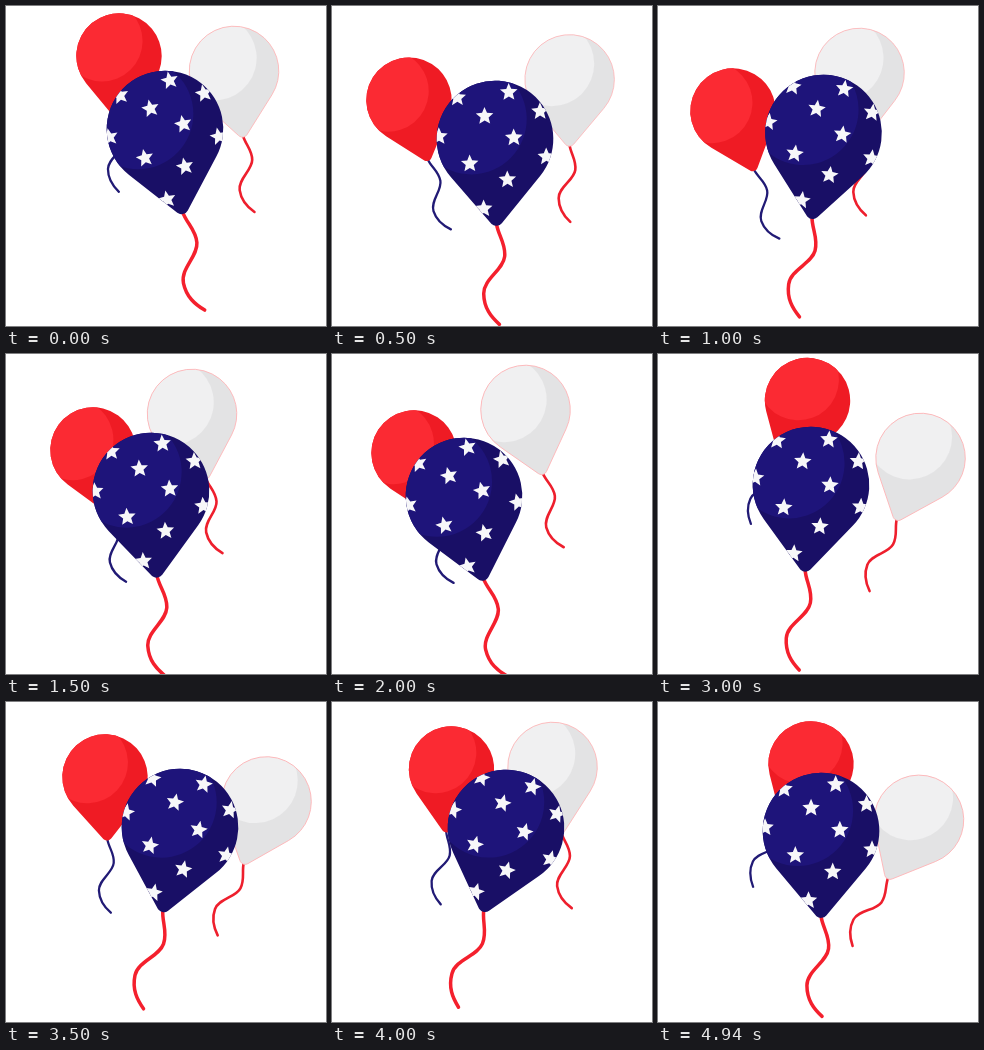
An HTML page with a canvas that plays this animation: 320 px wide and 320 px high, repeating every 5 s.

```html
<!DOCTYPE html>
<html lang="en">
<head>
<meta charset="utf-8">
<title>Balloons</title>
<style>
  html, body { margin: 0; width: 100%; height: 100%; overflow: hidden; background: #fff; }
  canvas { display: block; width: 320px; height: 320px; }
</style>
</head>
<body>
<canvas id="stage" width="320" height="320"></canvas>
<script>
const ctx = document.getElementById('stage').getContext('2d');
const LOOP = 5000, STEP = 62.5;
const RAD = Math.PI / 180;

// Poses are [seconds, centre x, centre y, tilt in degrees].
// Tilt is positive when the knot swings to the right.
const balloons = [
  {
    radius: 44.8, light: '#f0f0f1', dark: '#e3e3e4', string: '#ee1f2d', width: 2.6, edge: '#ffb3b5',
    poses: [
      [0, 228, 65, 7.9], [.3, 239, 73, 1], [.56, 235, 73, 0], [1, 201.5, 67, 2.2],
      [1.13, 192, 63, 5], [1.5, 186, 60, 12], [2, 193.5, 56, 15.2], [2.25, 206, 61, 10],
      [2.81, 241, 86, -9], [3, 262.5, 104, -21.3], [3.2, 272, 110, -26], [3.5, 260.5, 99.5, -20.4],
      [4, 220.5, 65, 7.4], [4.5, 252, 97, -16], [4.94, 261, 118, -28.2]
    ]
  },
  {
    radius: 42.7, light: '#fb2a33', dark: '#ef1b24', string: '#211a75', width: 2.3,
    poses: [
      [0, 113, 50, -.4], [.3, 87, 80, 13], [.75, 69.5, 107, 21], [1, 75, 105, 19.6],
      [1.4, 88, 95, 13], [1.75, 80, 102, 18], [2, 82, 99, 16.6], [2.25, 93, 89, 11],
      [2.81, 141, 49, -20], [3, 149.5, 46.5, -25], [3.38, 106, 70, -3], [3.5, 99, 75, 2.1],
      [3.75, 100, 77, 3], [4, 119.5, 67, -4.9], [4.4, 148, 52.5, -21], [4.94, 153, 62, -25.6]
    ]
  },
  {
    radius: 58.3, light: '#1e147a', dark: '#190f66', string: '#f4202d', width: 3.5,
    stars: [
      [14.6, -46.5], [-37, -42], [45.5, -26.8], [-10, -23], [18.8, -1],
      [-56, -3.5], [51, 18.5], [-25.7, 24.3], [11.7, 40.8], [-12.5, 69.5]
    ],
    poses: [
      [0, 159, 123, 12], [.5, 163, 133, 1], [1, 165.5, 127, -7.8], [1.5, 145, 137, 4],
      [2, 132, 142, 13.2], [2.4, 143, 128, 7], [3, 153, 131, -4], [3.5, 174, 125, -11.7],
      [4, 174, 126, -15.2], [4.5, 169, 130, -8], [4.94, 163, 129, 0]
    ]
  }
];

function slope(keys, i, channel) {
  const a = keys[Math.max(i - 1, 0)], b = keys[Math.min(i + 1, keys.length - 1)];
  return (b[channel] - a[channel]) / (b[0] - a[0]);
}

// Smooth Hermite curve through unevenly spaced poses.
function poseAt(keys, time) {
  let i = 0;
  while (i < keys.length - 2 && keys[i + 1][0] <= time) i++;
  const a = keys[i], b = keys[i + 1], span = b[0] - a[0];
  const u = Math.min((time - a[0]) / span, 1), u2 = u * u, u3 = u2 * u;
  return [1, 2, 3].map(c =>
    (2 * u3 - 3 * u2 + 1) * a[c] + (3 * u2 - 2 * u3) * b[c] +
    span * ((u3 - 2 * u2 + u) * slope(keys, i, c) + (u3 - u2) * slope(keys, i + 1, c)));
}

function bodyPath(r) {
  const path = new Path2D();
  path.arc(0, 0, r, 140 * RAD, 400 * RAD);
  path.arc(0, 1.37 * r, .12 * r, 40 * RAD, 140 * RAD);
  path.closePath();
  return path;
}

function stringPath(r) {
  const path = new Path2D();
  const curve = (...p) => path.bezierCurveTo(...p.map(v => v * r));
  path.moveTo(0, 1.45 * r);
  curve(.02, 1.65, .16, 1.8, .13, 2.02);
  curve(.1, 2.25, -.24, 2.4, -.24, 2.65);
  curve(-.24, 2.9, -.12, 3.05, .02, 3.18);
  return path;
}

function starPath(points) {
  const path = new Path2D();
  for (const [x, y] of points) {
    for (let k = 0; k < 10; k++) {
      const size = k % 2 ? 4.2 : 9.2, angle = (k * 36 - 90) * RAD;
      path[k ? 'lineTo' : 'moveTo'](x + size * Math.cos(angle), y + size * Math.sin(angle));
    }
    path.closePath();
  }
  return path;
}

for (const b of balloons) {
  b.body = bodyPath(b.radius);
  b.cord = stringPath(b.radius);
  b.pattern = starPath(b.stars || []);
}

function drawBalloon(b, time) {
  const [x, y, tilt] = poseAt(b.poses, time), r = b.radius;
  ctx.save();
  ctx.translate(x, y);
  ctx.rotate(-tilt * RAD);
  ctx.lineCap = 'round';
  ctx.strokeStyle = b.string;
  ctx.lineWidth = b.width;
  ctx.stroke(b.cord);
  ctx.fillStyle = b.dark;
  ctx.fill(b.body);
  ctx.save();
  ctx.clip(b.body);
  ctx.fillStyle = b.light;
  ctx.beginPath();
  ctx.arc(-.4 * r, -.35 * r, .95 * r, 0, 2 * Math.PI);
  ctx.fill();
  ctx.fillStyle = '#f7f7f9';
  ctx.fill(b.pattern);
  ctx.restore();
  if (b.edge) {
    ctx.strokeStyle = b.edge;
    ctx.lineWidth = .8;
    ctx.stroke(b.body);
  }
  ctx.restore();
}

function render(now) {
  const time = Math.floor((now % LOOP) / STEP) * STEP / 1000;
  ctx.fillStyle = '#fff';
  ctx.fillRect(0, 0, 320, 320);
  for (const b of balloons) drawBalloon(b, time);
}

let start;
function tick(now) {
  start ??= now;
  render(now - start);
  requestAnimationFrame(tick);
}
render(0);
requestAnimationFrame(tick);
</script>
</body>
</html>
```
